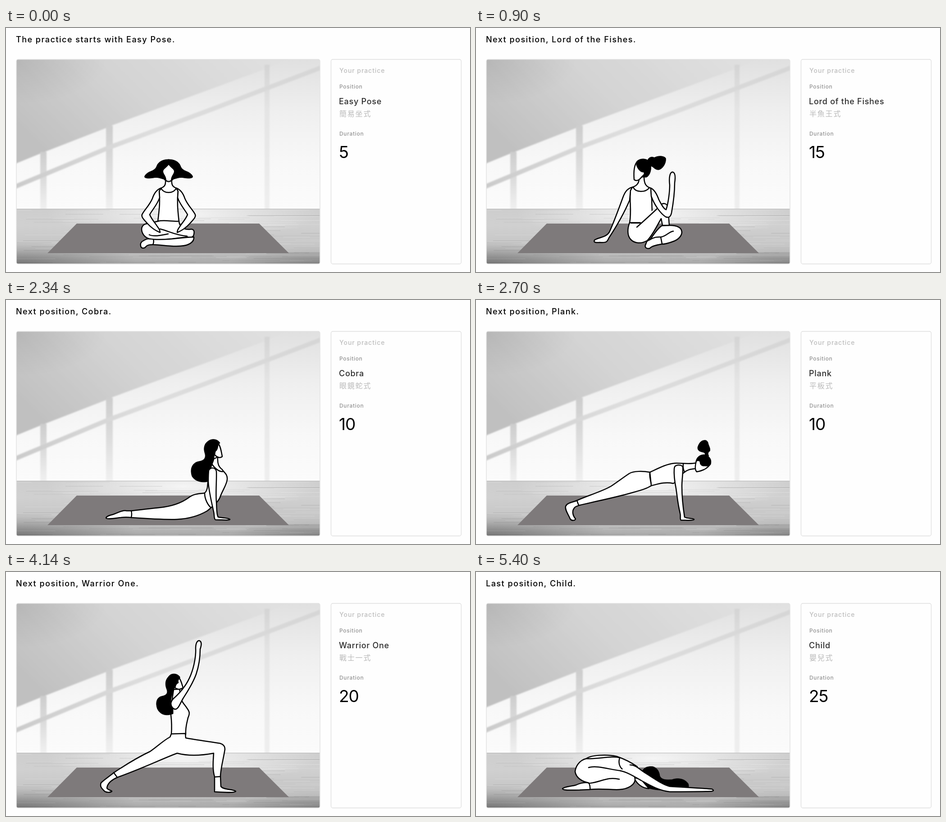
An HTML page that plays this animation: 1030 by 544 pixels, repeating every 6300 ms.

```html
<!DOCTYPE html>
<html lang="en">
<head>
<meta charset="utf-8">
<title>Yoga practice</title>
<style>
html, body { margin: 0; width: 100%; height: 100%; overflow: hidden; background: #fefefe; }
svg { display: block; width: 1030px; height: 544px; }
text { font-family: Inter, "Open Sans", sans-serif; font-weight: 500; }
.frame { fill: none; stroke: #dedede; stroke-width: 1.3; }
#title { font-size: 18px; letter-spacing: 1.48px; }
.head { font-size: 14px; letter-spacing: .95px; fill: #bdbdbd; }
.label { font-size: 12px; letter-spacing: .7px; fill: #929292; }
#name { font-size: 18px; letter-spacing: .72px; fill: #2c2c2c; }
#local { font: 400 16px "Noto Sans CJK TC", "Noto Sans CJK", sans-serif; letter-spacing: 1.8px; fill: #b9b9b9; }
#time { font-size: 37px; font-weight: 400; letter-spacing: -1px; }
#poses g { display: none; fill: #fff; stroke: #000; stroke-width: 2.5; stroke-linejoin: round; stroke-linecap: round; }
#poses g.on { display: inline; }
#poses .k { fill: #000; stroke-width: 1; }
#poses .l { fill: none; }
</style>
</head>
<body>
<svg viewBox="0 0 1030 544">
  <defs>
    <clipPath id="room"><rect x="23.5" y="70.5" width="673" height="455" rx="4"/></clipPath>
    <linearGradient id="light" x1="0" y1="0" x2="0" y2="1">
      <stop offset="0" stop-color="#e0e0e0"/><stop offset=".35" stop-color="#efefef"/>
      <stop offset=".7" stop-color="#f8f8f8"/><stop offset="1" stop-color="#fbfbfb"/>
    </linearGradient>
    <linearGradient id="shade" x1="0" y1=".6" x2="1" y2=".2">
      <stop offset="0" stop-color="#c0c0c0"/><stop offset=".45" stop-color="#d3d3d3"/>
      <stop offset="1" stop-color="#e0e0e0"/>
    </linearGradient>
    <linearGradient id="bar" gradientUnits="userSpaceOnUse" x1="23" y1="0" x2="697" y2="0">
      <stop offset="0" stop-color="#cbcbcb"/><stop offset=".45" stop-color="#dedede"/>
      <stop offset="1" stop-color="#d6d6d6"/>
    </linearGradient>
    <linearGradient id="post" x1="0" y1="0" x2="0" y2="1">
      <stop offset="0" stop-color="#cdcdcd"/><stop offset=".4" stop-color="#dadada"/>
      <stop offset="1" stop-color="#f2f2f2"/>
    </linearGradient>
    <linearGradient id="farPost" x1="0" y1="0" x2="0" y2="1">
      <stop offset="0" stop-color="#d4d4d4"/><stop offset=".3" stop-color="#e4e4e4"/>
      <stop offset="1" stop-color="#efefef"/>
    </linearGradient>
    <linearGradient id="floor" x1="0" y1="0" x2="0" y2="1">
      <stop offset="0" stop-color="#cecece"/><stop offset=".3" stop-color="#d0d0d0"/>
      <stop offset=".75" stop-color="#c4c4c4"/><stop offset="1" stop-color="#a8a8a8"/>
    </linearGradient>
    <radialGradient id="glow" cx=".55" cy=".1" r=".45">
      <stop offset="0" stop-color="#fff" stop-opacity=".8"/><stop offset="1" stop-color="#fff" stop-opacity="0"/>
    </radialGradient>
    <radialGradient id="corner" cx="0" cy="1" r=".4">
      <stop offset="0" stop-opacity=".3"/><stop offset="1" stop-opacity="0"/>
    </radialGradient>
    <radialGradient id="corner2" cx="1" cy="1" r=".3">
      <stop offset="0" stop-opacity=".22"/><stop offset="1" stop-opacity="0"/>
    </radialGradient>
    <radialGradient id="dusk" cx="0" cy="0" r=".3">
      <stop offset="0" stop-opacity=".09"/><stop offset="1" stop-opacity="0"/>
    </radialGradient>
    <filter id="soft"><feGaussianBlur stdDeviation="1.7"/></filter>
  </defs>

  <g clip-path="url(#room)">
    <rect x="23" y="70" width="674" height="334" fill="url(#light)"/>
    <g filter="url(#soft)">
      <path fill="url(#shade)" d="M15 60V305L76 280 222 223 238 216 574 92 630 67V60Z"/>
      <path fill="url(#post)" d="M76 276H90V410H76Z"/>
      <path fill="url(#post)" d="M222 218H237V410H222Z"/>
      <path fill="url(#farPost)" d="M574 82H585V410H574Z"/>
      <path fill="none" stroke="url(#bar)" stroke-width="10" d="M15 356 230 266 460 180 705 86"/>
    </g>
    <rect x="23" y="70" width="674" height="334" fill="url(#dusk)"/>
    <rect x="23" y="403" width="674" height="123" fill="url(#floor)"/>
    <rect x="23" y="403" width="674" height="123" fill="url(#glow)"/>
    <g id="grain" fill="none"></g>
    <rect x="23" y="403" width="674" height="123" fill="url(#corner)"/>
    <rect x="23" y="403" width="674" height="123" fill="url(#corner2)"/>
    <path stroke="#b4b4b4" d="M23 403.5H697"/>
    <path fill="#7e7a7b" d="M157 436H562L628 502H92Z"/>
  </g>

  <g id="poses">
    <g>
      <path class="k" d="M361 293C347 293 338 299 335 307C332 316 325 318 318 321C312 324 306 330 308 333C312 336 320 335 327 334C336 332 342 335 350 337L356 343H366L372 337C380 335 386 332 395 334C402 335 410 336 414 333C416 330 410 324 404 321C397 318 390 316 387 307C384 299 375 293 361 293Z"/>
      <path d="M354 338C355 350 352 354 344 357L340 364C343 390 339 412 337 432H384C382 412 379 390 382 364L378 357C370 354 367 350 368 338Z"/>
      <path stroke="none" d="M361 305C357 311 350 314 349 319C349 326 355 328 356 339H366C367 328 373 326 373 319C372 314 365 311 361 305Z"/>
      <path class="l" d="M354 338C357 344 365 344 368 338M344 357C350 370 372 370 378 357"/>
      <path d="M314 436C303 437 298 446 303 457C307 466 316 471 328 472C350 474 380 468 402 466C410 468 416 467 417 460C419 452 416 447 408 449C395 450 385 444 384 431C370 432 350 427 337 431Z"/>
      <path d="M327 471C318 470 314 469 309 472C303 475 297 478 299 486C300 492 307 492 310 488C314 483 320 483 326 483C345 483 365 488 388 486C405 485 418 478 417 466C390 466 365 474 327 471Z"/>
      <path class="l" d="M327 471Q329 477 326 483M318 461C328 466 345 462 360 459M342 448C360 452 375 462 402 464"/>
      <path d="M344 357C335 360 329 368 325 380C319 395 306 407 302 416C300 422 307 428 314 436C322 445 330 451 342 456C342 448 337 445 333 438C327 430 322 424 319 416C325 405 337 392 341 378L340 364Z"/>
      <path d="M378 357C387 360 393 368 397 380C403 395 416 407 420 416C422 422 415 428 408 436C400 445 392 451 380 456C380 448 385 445 389 438C395 430 400 424 403 416C397 405 385 392 381 378L382 364Z"/>
    </g>
    <g>
      <path class="k" d="M381 296C382 288 390 286 396 289C402 285 416 284 421 290C423 300 415 314 406 316C398 317 394 310 391 309C385 306 380 302 381 296Z"/>
      <path d="M412 441C425 440 445 438 454 447C462 458 452 470 440 475C430 479 420 482 411 482C400 484 390 486 386 491C380 493 374 490 376 484C379 478 377 475 386 472C392 465 400 450 412 441Z"/>
      <path class="l" d="M386 472C397 465 404 466 410 466C422 465 428 454 438 453M410 466L413 481"/>
      <path d="M391 412L390 380 388 357C378 354 373 348 373 332H362C363 347 356 352 347 355L343 362C340 385 346 405 341 435H365"/>
      <path stroke="none" d="M342 436H364L390 408 411 396 357 446H341Z"/>
      <path d="M341 434C336 447 335 463 344 472C352 480 366 482 380 474C392 462 402 440 411 425L414 440H429L426 400C425 392 416 388 410 395C395 410 375 428 357 444"/>
      <path class="l" d="M341 434H365M349 355C354 367 376 367 384 357"/>
      <path d="M358 298C350 306 350 325 351 338C355 342 362 340 367 333L374 326L370 303Z"/>
      <path class="k" d="M357 297C364 290 378 290 386 298C391 310 388 325 381 331C378 334 374 333 371 331C374 326 375 322 372 321C366 323 358 314 356 305Z"/>
      <path d="M347 355C335 358 330 367 326 378C318 400 303 440 296 455C288 468 270 467 263 473C260 478 266 479 275 478C290 479 291 477 295 468C310 445 330 410 341 384L343 362Z"/>
      <path d="M388 357C396 360 402 372 406 383C411 392 416 403 422 405C427 390 430 365 430 350C428 335 430 322 436 321C442 322 443 332 441 345C441 365 438 390 434 412C432 421 428 424 421 421C410 414 396 395 389 375Z"/>
    </g>
    <g>
      <path d="M460 355C450 375 449 400 447 418C445 428 442 431 437 431C425 432 415 433 405 441C390 452 370 460 340 463C320 465 295 468 278 470L268 470C258 468 250 474 238 478C230 480 223 482 222 486C224 490 245 486 255 485C263 484 270 484 278 485C320 488 350 490 380 489C400 488 425 483 447 470C465 455 472 448 475 440C480 425 490 412 491 400C492 388 484 385 480 378C472 372 469 365 470 350Z"/>
      <path class="l" d="M278 470Q280 477 278 485M441 431C441 445 449 458 455 463M456 364C462 374 474 385 483 382"/>
      <path d="M470 319C476 324 478 338 480 349C474 354 468 350 463 345L466 325Z"/>
      <path class="k" d="M447 316C455 308 470 309 475 319C469 322 472 330 467 336C461 340 463 350 461 358C456 372 450 385 450 404C440 408 420 406 413 393C407 375 415 362 428 360C440 358 445 352 441 340C438 330 441 320 447 316Z"/>
      <path d="M450 380C454 372 465 373 467 382C468 400 465 430 467 450C468 465 467 478 471 484C480 486 492 485 497 489C497 492 480 490 465 490C461 488 463 480 461 472C456 450 450 425 449 405C449 395 449 388 450 380Z"/>
    </g>
    <g>
      <path class="k" d="M506 313C499 313 494 321 492 329C492 338 500 338 506 340C510 342 508 346 507 347L517 348C514 343 515 339 519 337C521 330 516 325 515 318C513 313 510 312 506 313Z"/>
      <path d="M386 384C400 378 420 366 440 364C455 363 475 367 489 363L487 376C478 377 470 377 460 386C455 395 445 405 438 409C420 405 405 410 389 414Z"/>
      <path d="M386 384C370 381 350 381 340 387C325 397 315 405 300 415C280 427 250 435 224 447C215 451 202 452 199 460C197 468 205 478 209 488C212 493 220 492 221 488C214 480 213 470 218 464C220 460 225 460 228 458C270 448 310 440 345 430C370 423 380 420 389 414C389 405 384 395 386 384Z"/>
      <path class="l" d="M224 447L228 458M460 366Q459 377 463 383"/>
      <path d="M489 359C486 370 486 379 490 383C500 381 512 378 520 366L505 350Z"/>
      <path class="k" d="M488 360C490 348 500 344 508 345C518 347 524 356 521 366C519 370 515 371 508 370C500 371 497 367 497 360C494 358 491 358 488 360Z"/>
      <path d="M440 376C440 366 456 366 459 372C460 385 457 400 457 415C457 440 460 465 463 484C470 488 482 486 484 489C484 492 470 491 455 491C452 488 455 482 453 475C448 455 447 440 444 420C441 405 439 390 440 376Z"/>
    </g>
    <g>
      <path d="M372 262L366 304V318C368 335 368 350 367 362H399C398 345 402 335 404 325C408 316 408 312 402 304C397 296 392 292 390 286L385 261Z"/>
      <path d="M385 237C389 243 391 252 393 258C387 263 380 262 375 258L380 240Z"/>
      <path class="k" d="M361 233C366 225 380 225 386 234C387 238 380 240 383 247C376 251 374 258 371 268C366 280 363 290 371 304V316C355 322 342 318 336 305C331 291 335 279 346 277C356 275 360 270 357 262C352 250 354 240 361 233Z"/>
      <path d="M370 303C363 295 366 288 372 282C388 268 402 250 410 230C418 210 422 185 421 170C421 160 424 153 429 153C435 155 434 163 431 172C431 190 428 210 422 228C414 250 402 268 393 282C386 294 383 305 376 306C373 306 371 304 370 303Z"/>
      <path d="M367 361L398 360L399 370C420 374 450 378 475 382C482 384 486 388 486 395C482 420 476 440 476 456L477 478C482 486 505 484 510 489C508 493 480 491 463 490C463 480 463 468 463 456C458 440 460 420 461 404C440 408 410 412 380 404C350 415 310 435 247 458C238 462 225 470 224 482C228 487 235 487 235 489C232 492 222 492 218 488C212 482 208 478 211 470C218 463 230 455 240 447C265 430 295 412 320 400C335 390 350 375 364 368Z"/>
      <path class="l" d="M239 447L247 458M463 457L476 456"/>
    </g>
    <g>
      <path d="M316 323C335 340 360 365 375 378C385 387 395 403 407 417L418 440L372 420C355 424 345 420 340 402C332 385 315 365 300 354Z"/>
      <path d="M316 323C305 313 290 308 277 312C265 316 262 328 258 342C245 380 225 415 215 456C212 466 207 475 206 484C215 488 235 486 246 484C248 480 242 478 232 477C224 478 224 466 228 460C245 430 275 380 296 355L300 354C303 342 310 332 316 323Z"/>
      <path class="l" d="M215 456L228 460"/>
      <path class="k" d="M406 419C411 412 425 411 433 417C441 424 441 437 434 444C427 449 418 447 413 441C419 437 416 430 412 426Z"/>
      <path d="M368 418C361 408 361 395 370 391C380 390 385 398 389 407C396 424 410 445 430 458C450 468 470 480 485 484C498 485 512 485 514 488C512 492 495 491 480 489C460 486 440 475 424 467C400 455 385 435 368 418Z"/>
      <path class="l" d="M371 397Q372 404 378 411M376 391Q387 394 403 420"/>
    </g>
    <g>
      <path class="k" d="M369 445C372 434 385 433 393 434C403 437 407 446 408 455C413 465 425 463 435 463C448 458 464 461 471 472C474 480 470 483 466 483L430 486C405 488 385 484 372 478C366 470 364 455 369 445Z"/>
      <path d="M350 458C358 474 370 482 384 483L366 462Z"/>
      <path d="M245 416C255 408 290 406 312 411C330 417 345 425 358 434L345 455L250 440Z"/>
      <path d="M245 416C228 420 221 435 220 445C222 460 238 468 250 470C240 468 228 472 222 475C212 478 196 478 192 483C193 488 215 486 230 486L252 485C275 482 300 486 318 485C338 484 354 474 353 461C352 452 345 447 335 444C322 442 314 430 319 414C300 409 270 418 245 416Z"/>
      <path class="l" d="M250 436C270 430 300 442 335 445M250 471C275 470 290 455 318 462M251 471Q254 478 253 485"/>
      <path d="M342 430C355 430 363 440 374 447C395 460 415 475 430 478C460 480 500 482 524 484C529 487 527 489 520 489C490 490 460 490 430 490C405 487 385 475 367 465C350 455 335 446 320 443"/>
    </g>
  </g>

  <rect class="frame" x="23" y="70" width="674" height="456" rx="4"/>
  <rect class="frame" x="721.5" y="70" width="289" height="456" rx="4"/>
  <text id="title" x="22" y="32"></text>
  <text class="head" x="740" y="100">Your practice</text>
  <text class="label" x="740" y="135">Position</text>
  <text id="name" x="739" y="170"></text>
  <text id="local" x="740" y="197"></text>
  <text class="label" x="740" y="240">Duration</text>
  <text id="time" x="739" y="290"></text>
</svg>
<script>
const HOLD = 900;
const steps = [
  ["Easy Pose", "簡易坐式", 5],
  ["Lord of the Fishes", "半魚王式", 15],
  ["Cobra", "眼鏡蛇式", 10],
  ["Plank", "平板式", 10],
  ["Warrior One", "戰士一式", 20],
  ["Downward Facing Dog", "下犬式", 10],
  ["Child", "嬰兒式", 25],
];
const byId = id => document.getElementById(id);
const figures = [...byId("poses").children];

// Soft floorboard streaks
let seed = 7;
const rand = () => (seed = seed * 16807 % 2147483647) / 2147483647;
let streaks = "";
for (let i = 0; i < 110; i++) {
  const x = 23 + rand() * 640, y = 406 + rand() * 118, w = 40 + rand() * 160;
  streaks += `<path d="M${x} ${y}h${w}" stroke="${rand() < .5 ? "#fff" : "#777"}" opacity="${.1 + rand() * .18}"/>`;
}
byId("grain").innerHTML = streaks;

let shown = -1;
function show(i) {
  const [name, local, time] = steps[i];
  const intro = i === 0 ? "The practice starts with " : i === steps.length - 1 ? "Last position, " : "Next position, ";
  byId("title").textContent = intro + name + ".";
  byId("name").textContent = name;
  byId("local").textContent = local;
  byId("time").textContent = time;
  figures.forEach((g, k) => g.classList.toggle("on", k === i));
  shown = i;
}

let start;
function tick(now) {
  start ??= now;
  const i = Math.floor((now - start) / HOLD) % steps.length;
  if (i !== shown) show(i);
  requestAnimationFrame(tick);
}
show(0);
requestAnimationFrame(tick);
</script>
</body>
</html>
```
